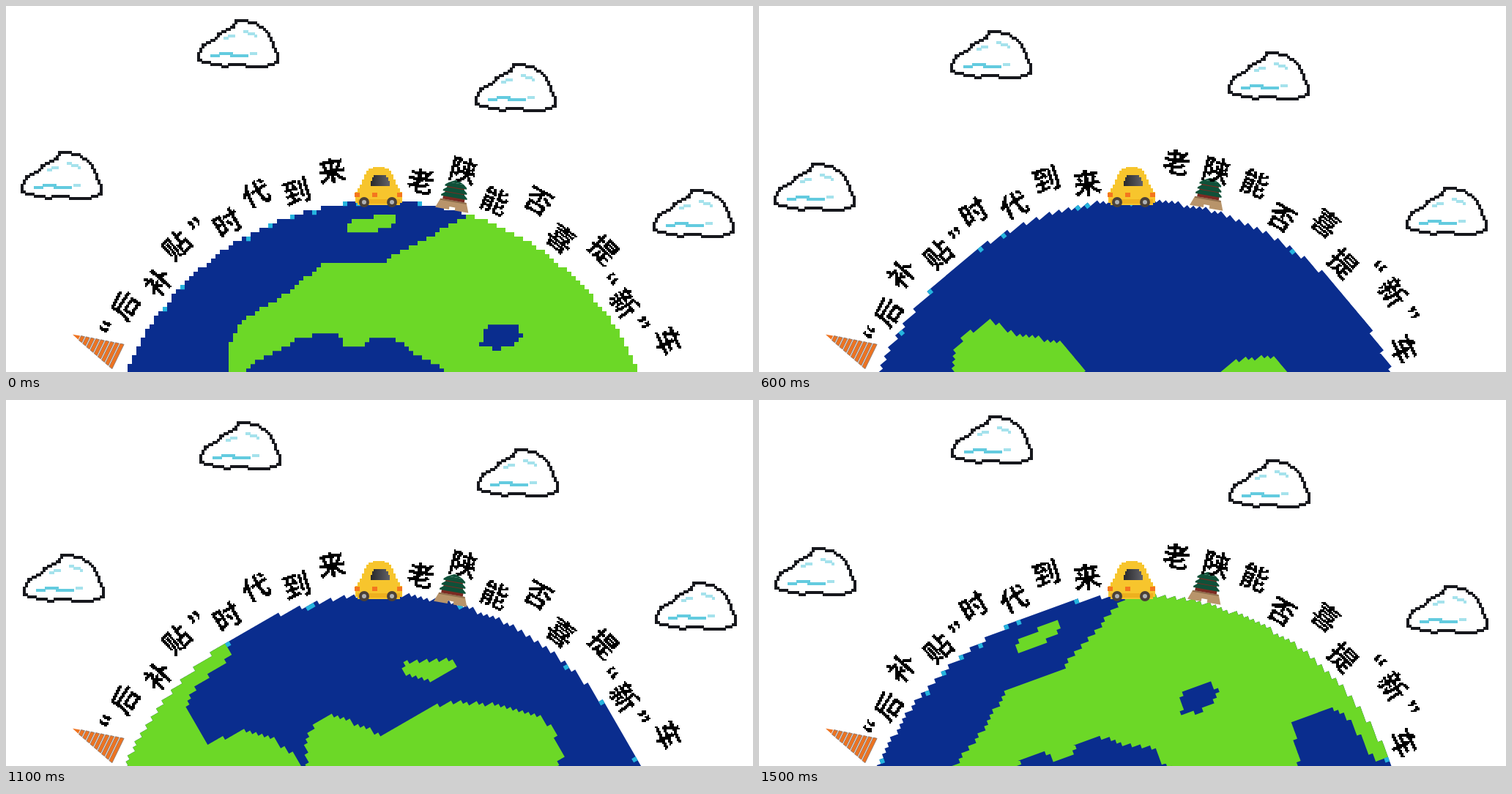
An HTML page that plays this animation: 1020 by 500 pixels, repeating every 1600 ms.

```html
<!DOCTYPE html>
<html lang="zh">
<head>
<meta charset="utf-8">
<title>Pixel globe</title>
<style>
html, body { margin: 0; width: 100%; height: 100%; overflow: hidden; background: #fff; }
svg { display: block; width: 1020px; height: 500px; }
text { text-anchor: middle; font: 700 38px "Noto Sans CJK SC", "Noto Sans CJK", sans-serif; }
.quote { font: 700 42px "Liberation Sans", sans-serif; }
</style>
</head>
<body>
<svg id="stage" viewBox="0 0 1020 500" xmlns="http://www.w3.org/2000/svg">
  <defs>
    <!-- Samples the text on a 2px grid -->
    <filter id="pixel" filterUnits="userSpaceOnUse" x="0" y="0" width="1020" height="500">
      <feFlood x="0" y="0" width="1" height="1"/>
      <feComposite x="0" y="0" width="2" height="2"/>
      <feTile result="dots"/>
      <feComposite in="SourceGraphic" in2="dots" operator="in"/>
      <feComponentTransfer result="a"><feFuncA type="discrete" tableValues="0 1"/></feComponentTransfer>
      <feOffset in="a" dx="1" dy="0" result="b"/>
      <feMerge result="row"><feMergeNode in="a"/><feMergeNode in="b"/></feMerge>
      <feOffset in="row" dx="0" dy="1" result="c"/>
      <feMerge><feMergeNode in="row"/><feMergeNode in="c"/></feMerge>
    </filter>
    <linearGradient id="glass"><stop offset="0" stop-color="#28282b"/><stop offset="1" stop-color="#626268"/></linearGradient>
  </defs>
  <g id="clouds"></g>
  <g id="globe"></g>
  <g id="pagoda" transform="translate(153 479) rotate(-64)"></g>
  <g id="tower">
    <path fill="#b8946a" d="M-18 6H18L23 19H4V15H-4V19H-23Z"/>
    <path fill="#8f6f4c" d="M-18 6H18V8H-18Z"/>
  </g>
  <g id="car">
    <path fill="#f7c52d" d="M501 220h16v2h6v3h3v5h3v7h3v7h3v5h3v5h3v15h-3v3h-58v-3h-3v-15h3v-5h3v-5h3v-7h3v-7h3v-5h3v-3h6z"/>
    <path fill="#eeb01f" d="M480 264h58v6h-58z"/>
    <path fill="url(#glass)" d="M502 231h17v3h3v5h2v7h-26v-7h2v-5h2z"/>
    <path fill="#f4761e" d="M476 255h7v6h-7zM500 255h7v6h-7zM534 255h7v6h-7z"/>
    <g fill="#4a4038"><circle cx="489" cy="268" r="7"/><circle cx="527" cy="268" r="7"/></g>
    <g fill="#aeb0b4"><circle cx="489" cy="268" r="3"/><circle cx="527" cy="268" r="3"/></g>
  </g>
  <g id="words" filter="url(#pixel)"></g>
</svg>
<script>
const NS = "http://www.w3.org/2000/svg";
const $ = id => document.getElementById(id);
function add(parent, tag, attrs) {
  const el = document.createElementNS(NS, tag);
  for (const k in attrs) el.setAttribute(k, attrs[k]);
  return parent.appendChild(el);
}
const points = s => s.trim().split(/\s+/).map(p => p.split(",").map(Number));
const box = (x, y, w, h) => `M${x} ${y}h${w}v${h}h${-w}z`;

// Globe: key points of the coasts around its centre, cut into square cells
const CX = 514, CY = 645, R = 379, CELL = 6;
const north = points(`118,-400 118,-358 26,-311 2,-294 -84,-291 -128,-254 -194,-214 -208,-186 -208,-128
  -174,-158 -114,-191 -66,-201 -50,-181 -24,-181 -14,-192 14,-194 42,-171 81,-153 86,-128 137,-74 174,-30
  195,-23 238,-41 263,-71 272,-123 328,-118 343,-105 360,-29 400,-29 400,-400`);
const south = points(`-250,8 -250,-60 -182,-125 -83,-132 85,-95 140,-49 175,-19 211,-1 221,20 220,49 164,91
  162,176 145,212 110,262 81,290 57,298 12,295 2,261 -45,200 -34,120 -155,36 -210,35`);
const isles = [
  points("-51,-346 -29,-356 18,-359 18,-348 -9,-338 -49,-334"),
  points("190,232 206,225 232,173 229,156 193,188")
];
const lake = points("132,-180 143,-206 161,-213 184,-208 191,-196 179,-181 156,-176");

function inside(poly, x, y) {
  let hit = false;
  poly.forEach(([ax, ay], i) => {
    const [bx, by] = poly[(i || poly.length) - 1];
    if ((ay > y) !== (by > y) && x < (bx - ax) * (y - ay) / (by - ay) + ax) hit = !hit;
  });
  return hit;
}
const isLand = (x, y) => [north, south, ...isles].some(p => inside(p, x, y)) && !inside(lake, x, y);
const inDisc = (x, y) => Math.hypot(x, y) < R;

// Joins neighbouring cells of a row into one rectangle
function raster(test) {
  let d = "";
  for (let j = -64; j < 64; j++) {
    let start = null;
    for (let i = -64; i <= 64; i++) {
      const on = i < 64 && test((i + .5) * CELL, (j + .5) * CELL);
      if (on && start === null) start = i;
      if (!on && start !== null) {
        d += box(start * CELL, j * CELL, (i - start) * CELL, CELL + .3);
        start = null;
      }
    }
  }
  return d;
}
let seed = 11;
const rand = () => (seed = seed * 16807 % 2147483647) / 2147483647;
const isFoam = (x, y) => inDisc(x, y) && !inDisc(x * 1.012, y * 1.012) && !isLand(x, y) && rand() < .1;

const globe = $("globe");
add(globe, "path", { fill: "#0a2d8e", d: raster(inDisc) });
add(globe, "path", { fill: "#6cd827", d: raster((x, y) => inDisc(x, y) && isLand(x, y)) });
add(globe, "path", { fill: "#25b4de", d: raster(isFoam) });

// Cloud: outline walked on a 3px grid with a 4px pen
const rim = points(`17,0 22,0 23,1 26,1 31,5 34,11 36,16 36,19 32,20 31,21 22,21 21,20 14,20 12,21 9,20
  3,19 0,18 0,15 2,11 8,8 9,6 16,3 17,0`);
const dot = (x, y, w = 1) => box(3 * x, 3 * y, 3 * w + 1, 4);
function trace(list) {
  let d = "";
  for (let k = 1; k < list.length; k++) {
    const [ax, ay] = list[k - 1], [bx, by] = list[k];
    const n = Math.max(Math.abs(bx - ax), Math.abs(by - ay));
    for (let i = 0; i < n; i++)
      d += dot(Math.round(ax + (bx - ax) * i / n), Math.round(ay + (by - ay) * i / n));
  }
  return d;
}
// Home, direction of the first nudge, later rise or fall
const clouds = [
  { x: 20, y: 198, dx: 0, dy: -6, lift: 20 },
  { x: 261, y: 18, dx: 6, dy: 0, lift: 18 },
  { x: 640, y: 78, dx: -6, dy: -6, lift: -20 },
  { x: 883, y: 250, dx: -6, dy: -6, lift: -4 }
];
for (const c of clouds) {
  c.el = add($("clouds"), "g", { "shape-rendering": "crispEdges" });
  add(c.el, "path", { fill: "#17181d", d: trace(rim) });
  add(c.el, "path", { fill: "#63cbdf", d: dot(6, 16, 4) + dot(10, 15, 6) + dot(15, 16, 8) });
  add(c.el, "path", { fill: "#a5e2ec", d: dot(12, 8, 2) + dot(14, 7, 3) + dot(21, 5, 2) + dot(23, 6, 3) + dot(26, 7) + dot(24, 15, 3) });
}

// Pagoda: tiers that narrow upwards
for (let i = 0; i < 9; i++) {
  const y = -i * 6.6, w = 18.5 - i * 1.75;
  add($("pagoda"), "path", { fill: "#ee7320", stroke: "#8d7a70", "stroke-width": .8, d: `M${-w} ${y}L${1 - w} ${y - 5}H${w - 1}L${w} ${y}Z` });
}
add($("pagoda"), "path", { fill: "#ee7320", d: "M-3 -59L0 -69L3 -59Z" });

// Tower: three roofs over red walls
for (let i = 0; i < 3; i++) {
  const y = -14 + i * 7, w = 15 + i * 1.5;
  add($("tower"), "path", { fill: "#7b2b22", d: box(3 - w, y, 2 * w - 6, 6) });
  add($("tower"), "path", { fill: "#0f5139", d: `M${5 - w} ${y - 4}H${w - 5}L${w} ${y}V${y + 2}H${-w}V${y}Z` });
}
add($("tower"), "path", { fill: "#0f5139", d: "M-10 -18L-2 -22H2L10 -18Z" });

// Headline: characters spread along the globe, every other one hops
const HALF = 3.7, QUOTE_HALF = 1.4, LOW = 404;
const isQuote = c => "“”".includes(c);
function spread(text, from, hop, first) {
  let angle = from, count = first, prev = 0;
  return [...text].map(char => {
    const quote = isQuote(char), half = quote ? QUOTE_HALF : HALF;
    if (prev) angle += prev + half;
    prev = half;
    const odd = char === "”" ? (count - 1) % 2 : count % 2;
    if (!quote) count++;
    return { char, quote, angle, hop, odd };
  });
}
const letters = [...spread("“后补贴”时代到来", -61.8, 17, 0), ...spread("老陕能否喜提“新”车", 7.4, 26, 7)];
const layouts = [0, 1].map(phase => {
  const g = add($("words"), "g", {});
  for (const { char, quote, angle, hop, odd } of letters) {
    const up = odd === phase || char === "陕"; // the tower holds this one up
    const r = LOW + (up ? hop : 0), a = angle * Math.PI / 180;
    const x = CX + r * Math.sin(a), y = 640 - r * Math.cos(a);
    const t = add(g, "text", { y: 14, transform: `translate(${x} ${y}) rotate(${angle})` });
    if (quote) t.setAttribute("class", "quote");
    t.textContent = char;
  }
  return g;
});

const place = (el, x, y, turn = 0) =>
  el.setAttribute("transform", `translate(${Math.round(x)} ${Math.round(y)}) rotate(${turn})`);

function draw(ms) {
  const tick = Math.floor(ms % 1600 / 100);
  const step = tick + (tick > 4) + (tick > 11); // 18 steps in 16 ticks
  const swing = Math.sin(step / 18 * 2 * Math.PI);
  const phase = Math.floor(tick / 4) % 2;
  place(globe, CX, CY, step * 20);
  const nudge = Math.max(0, 1 - Math.abs(step - 2) / 2);
  const bob = step > 4 && step < 14 ? Math.sin((step - 4) / 10 * Math.PI) : 0;
  for (const { el, x, y, dx, dy, lift } of clouds)
    place(el, x + dx * nudge + 3 * Math.max(0, -swing), y + dy * nudge + lift * bob + (step > 15 ? 3 : 0));
  place($("tower"), 612.3 + 2.5 * swing, phase ? 257 : 260, 10);
  layouts.forEach((g, i) => g.setAttribute("display", i === phase ? "inline" : "none"));
}

const start = performance.now();
function loop(now) {
  draw(Math.max(0, now - start));
  requestAnimationFrame(loop);
}
draw(0);
requestAnimationFrame(loop);
</script>
</body>
</html>
```
